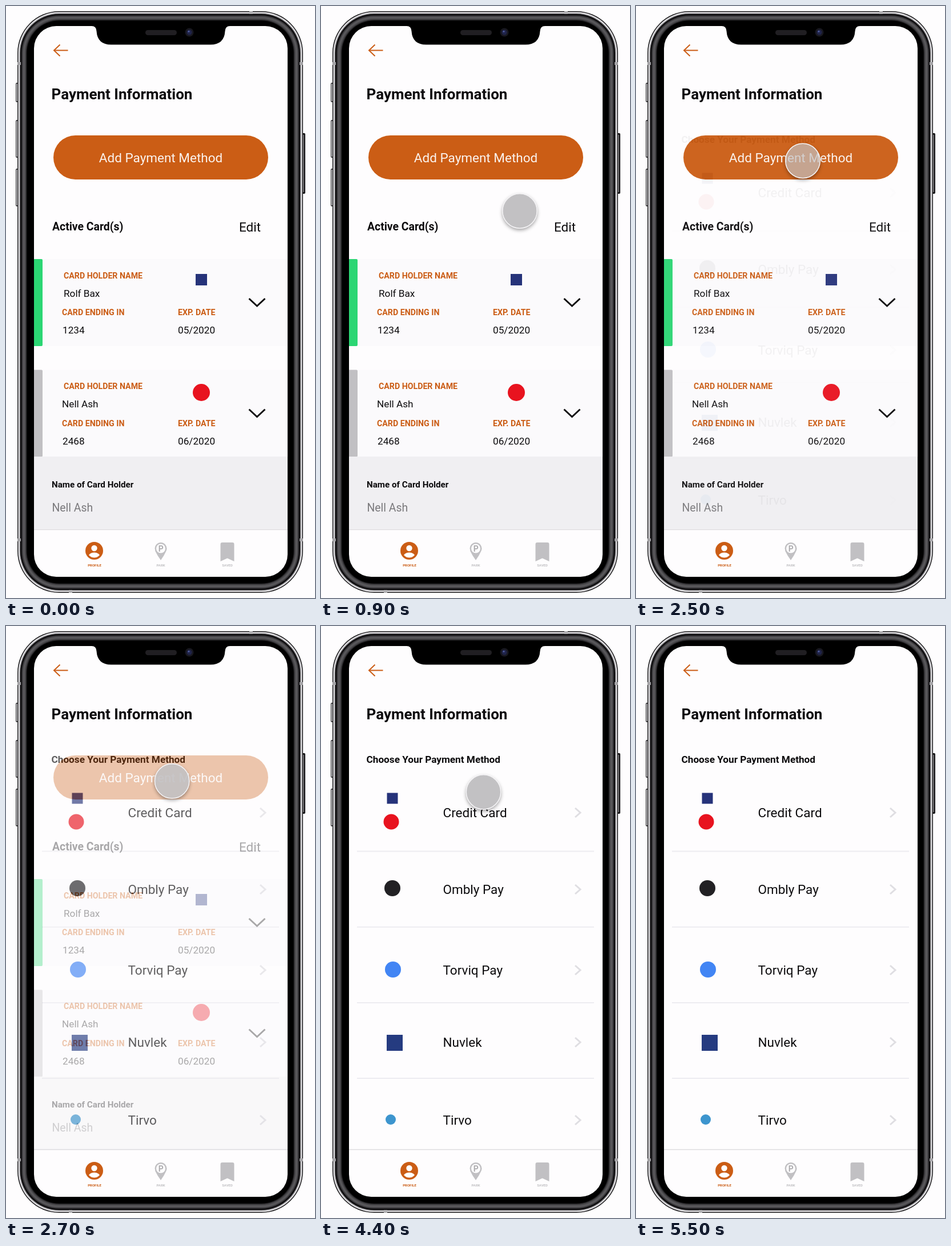
An HTML page with a canvas that plays this animation: 541x1034 px, repeating every 5700 ms.

```html
<!DOCTYPE html>
<html lang="en">
<head>
<meta charset="utf-8">
<title>Payment methods</title>
<style>
  html, body { margin: 0; width: 100%; height: 100%; overflow: hidden; background: #fefdfe; }
  canvas { display: block; width: 541px; height: 1034px; }
</style>
</head>
<body>
<canvas id="stage" width="541" height="1034"></canvas>
<script>
const W = 541, H = 1034, LOOP = 5700, STEP = 100;
const ORANGE = '#cb5d15', PAPER = '#fefdfe', GREY = '#c1c0c3';
const stage = document.getElementById('stage').getContext('2d');
let g = stage;

function layer(draw) {
  const canvas = document.createElement('canvas');
  canvas.width = W;
  canvas.height = H;
  g = canvas.getContext('2d');
  draw();
  g = stage;
  return canvas;
}

function box(x, y, w, h, color, r = 0) {
  g.fillStyle = color;
  g.beginPath();
  g.roundRect(x, y, w, h, r);
  g.fill();
}

function dot(x, y, r, color) {
  g.fillStyle = color;
  g.beginPath();
  g.arc(x, y, r, 0, Math.PI * 2);
  g.fill();
}

function line(points, color, width) {
  g.strokeStyle = color;
  g.lineWidth = width;
  g.beginPath();
  points.forEach(([x, y]) => g.lineTo(x, y));
  g.stroke();
}

function text(str, x, y, size, color = '#0c0b0d', weight = 400, align = 'left') {
  g.font = `${weight} ${size}px Roboto, sans-serif`;
  g.textAlign = align;
  g.fillStyle = color;
  g.fillText(str, x, y);
}

const square = (x, y, side, color) => box(x - side / 2, y - side / 2, side, side, color);

function drawPhone() {
  box(0, 0, W, H, PAPER);
  for (const [y, h] of [[134, 34], [199, 66], [284, 66]]) {
    box(17, y, 5, h, '#3e3d40', 2);
    box(18.3, y + 2, 2, h - 4, '#d2d1d4');
  }
  box(518, 222, 6, 106, '#1c1b1d', 2);
  box(520, 225, 1.5, 100, '#8b8a8d');

  const shells = [
    [0, '#1e1d1f'], [1.5, '#e0dfe2'], [3.8, '#7b7a7d'], [5, '#0d0c0e'],
    [7.5, '#3a393c'], [9.5, '#58575a'], [13, '#464548'], [15, '#232224'], [16.5, '#000']
  ];
  for (const [d, color] of shells) {
    box(20 + d, 9 + d, 500 - 2 * d, 1016 - 2 * d, color, 73 - d);
  }
  for (const y of [98, 930]) {
    box(20, y, 6, 5, '#a5a4a7');
    box(514, y, 6, 5, '#a5a4a7');
  }
  box(426, 9, 6, 5, '#b3b2b5');
  box(110, 1020, 6, 5, '#b3b2b5');

  box(49, 35, 444, 962, PAPER, 39);
  drawNotch();

  line([[108.5, 77.5], [84, 77.5]], ORANGE, 2);
  line([[94.5, 67.5], [84, 77.5], [94.5, 87.5]], ORANGE, 2);
  text('Payment Information', 79.5, 162.5, 26, '#0c0b0d', 700);
  drawNav();
}

function drawNotch() {
  g.fillStyle = '#000';
  g.beginPath();
  g.moveTo(150, 34);
  g.lineTo(150, 35);
  g.quadraticCurveTo(158, 35, 158.5, 44);
  g.quadraticCurveTo(160, 67.5, 184, 67.5);
  g.lineTo(358, 67.5);
  g.quadraticCurveTo(382, 67.5, 383.5, 44);
  g.quadraticCurveTo(384, 35, 392, 35);
  g.lineTo(392, 34);
  g.fill();
  box(244, 42, 55, 9, '#201e22', 4.5);
  dot(321, 46, 7.5, '#18181f');
  dot(321, 46, 4.5, '#20244a');
  dot(320, 44.5, 1.5, '#5260a0');
}

function drawNav() {
  line([[49, 914.5], [493, 914.5]], '#dddcdf', 1.5);

  dot(154.5, 951.5, 15.5, ORANGE);
  dot(154.5, 947, 5.2, '#fff');
  g.save();
  g.beginPath();
  g.arc(154.5, 951.5, 12, 0, Math.PI * 2);
  g.clip();
  g.beginPath();
  g.ellipse(154.5, 962, 10.5, 7.5, 0, 0, Math.PI * 2);
  g.fill();
  g.restore();
  text('PROFILE', 155, 979, 6, ORANGE, 700, 'center');

  g.fillStyle = GREY;
  g.beginPath();
  g.arc(271, 947.5, 10.5, Math.PI * 0.88, Math.PI * 0.12);
  g.quadraticCurveTo(277, 960, 271, 968);
  g.quadraticCurveTo(265, 960, 261, 951.5);
  g.fill();
  dot(271, 947.5, 8, PAPER);
  text('P', 271.3, 952.5, 14, '#aeadb0', 700, 'center');
  text('PARK', 271, 979, 6, GREY, 700, 'center');

  g.fillStyle = GREY;
  g.beginPath();
  g.moveTo(375.5, 970);
  g.lineTo(375.5, 940);
  g.quadraticCurveTo(375.5, 937, 378.5, 937);
  g.lineTo(396.5, 937);
  g.quadraticCurveTo(399.5, 937, 399.5, 940);
  g.lineTo(399.5, 970);
  g.lineTo(387.5, 964.5);
  g.fill();
  text('SAVED', 387.5, 979, 6, GREY, 700, 'center');
}

function drawCard(y, bar, name, nameX, digits, date) {
  box(49, y, 444, 152, '#fbfafc');
  box(49, y, 15, 152, bar, [0, 2, 2, 0]);
  text('CARD HOLDER NAME', 101, y + 33.5, 14.2, ORANGE, 700);
  text(name, nameX, y + 65.5, 17.2);
  text('CARD ENDING IN', 98, y + 98, 14.2, ORANGE, 700);
  text('EXP. DATE', 301, y + 98, 14.2, ORANGE, 700);
  text(digits, 99, y + 130, 17.2);
  text(date, 301, y + 130, 17.2);
  line([[425.5, y + 69], [439.5, y + 82], [453.5, y + 69]], '#0a090b', 3);
}

function drawCards() {
  box(83, 226, 376, 77, ORANGE, 38.5);
  text('Add Payment Method', 271, 273, 22.5, '#fbf3ee', 400, 'center');
  text('Active Card(s)', 81, 391.5, 19.4, '#0c0b0d', 700);
  text('Edit', 408, 393.5, 22.5);
  drawCard(442, '#2bd673', 'Rolf Bax', 101, '1234', '05/2020');
  drawCard(635.5, GREY, 'Nell Ash', 98, '2468', '06/2020');
  square(342, 478, 20, '#26337a');
  dot(342, 675, 15, '#e8131f');
  box(49, 787, 444, 127, '#f0eff2');
  text('Name of Card Holder', 80, 841, 15.2, '#0c0b0d', 700);
  text('Nell Ash', 80.5, 883, 19.4, '#7a797c');
}

function drawMethods() {
  box(49, 200, 444, 713, PAPER);
  text('Choose Your Payment Method', 79.5, 239, 17.2, '#0c0b0d', 700);
  const methods = [
    ['Credit Card', 326], ['Ombly Pay', 460], ['Torviq Pay', 601], ['Nuvlek', 727], ['Tirvo', 863]
  ];
  for (const [name, y] of methods) {
    text(name, 213.5, y + 8, 22.5);
    line([[445, y - 8], [454, y], [445, y + 8]], '#dfdee2', 3);
  }
  for (let i = 0; i < 4; i++) {
    const y = 393.5 + i * 132.2;
    line([[63, y], [478, y]], '#edecf1', 2);
  }
  square(125, 301, 19, '#26337a');
  dot(123, 342, 13.5, '#e8131f');
  dot(125, 458, 14, '#222124');
  dot(126, 600, 14, '#4285f4');
  square(129, 728, 28, '#253b80');
  dot(122, 862, 9, '#3d95ce');
}

// Piecewise-linear track: rows are [time, ...values].
function track(rows, t) {
  if (t <= rows[0][0]) return rows[0].slice(1);
  for (let i = 1; i < rows.length; i++) {
    const a = rows[i - 1], b = rows[i];
    if (t <= b[0]) {
      const k = (t - a[0]) / (b[0] - a[0]);
      return a.slice(1).map((v, j) => v + (b[j + 1] - v) * k);
    }
  }
  return rows[rows.length - 1].slice(1);
}

// Time, x, y, opacity
const touchPath = [
  [100, 485, 595, 1], [600, 387, 420, 1], [900, 348, 358, 1], [1200, 299, 280, 1],
  [1300, 292, 270.5, 1], [1500, 292, 270.5, 0.69], [2500, 292, 270.5, 0.69],
  [2800, 290, 271, 1], [3900, 290, 271, 1], [4200, 288, 277, 1], [4400, 284.5, 290, 1],
  [4500, 287, 311, 1], [4700, 311, 330, 1], [4900, 360, 364, 1], [5100, 435, 410, 1],
  [5300, 517, 460, 1], [5500, 600, 510, 1]
];
const fade = [[2400, 0], [2500, 0.045], [2600, 0.35], [2700, 0.65], [2800, 0.87], [2900, 0.97], [3000, 1]];

function drawTouch(x, y, opacity) {
  // The shadow stays outside the disc so it never tints a translucent one.
  g.save();
  g.beginPath();
  g.rect(0, 0, W, H);
  g.arc(x, y, 30, 0, Math.PI * 2);
  g.clip('evenodd');
  g.shadowColor = 'rgba(0,0,0,.38)';
  g.shadowBlur = 6;
  g.shadowOffsetY = 3;
  dot(x, y, 30.5, '#f5f4f6');
  g.restore();

  g.save();
  g.globalAlpha = opacity;
  dot(x, y, 30, '#c2c1c3');
  g.restore();
  g.strokeStyle = '#f5f4f6';
  g.lineWidth = 1.5;
  g.beginPath();
  g.arc(x, y, 30.2, 0, Math.PI * 2);
  g.stroke();
}

const phone = layer(drawPhone);
const cards = layer(drawCards);
const methods = layer(drawMethods);

function render(now) {
  const t = Math.floor((now % LOOP) / STEP) * STEP;
  const [mix] = track(fade, t);
  g.drawImage(phone, 0, 0);
  if (mix < 1) g.drawImage(cards, 0, 0);
  g.globalAlpha = mix;
  g.drawImage(methods, 0, 0);
  g.globalAlpha = 1;
  if (t >= 100 && t < 5500) drawTouch(...track(touchPath, t));
}

function tick() {
  render(performance.now());
  requestAnimationFrame(tick);
}
tick();
</script>
</body>
</html>
```
